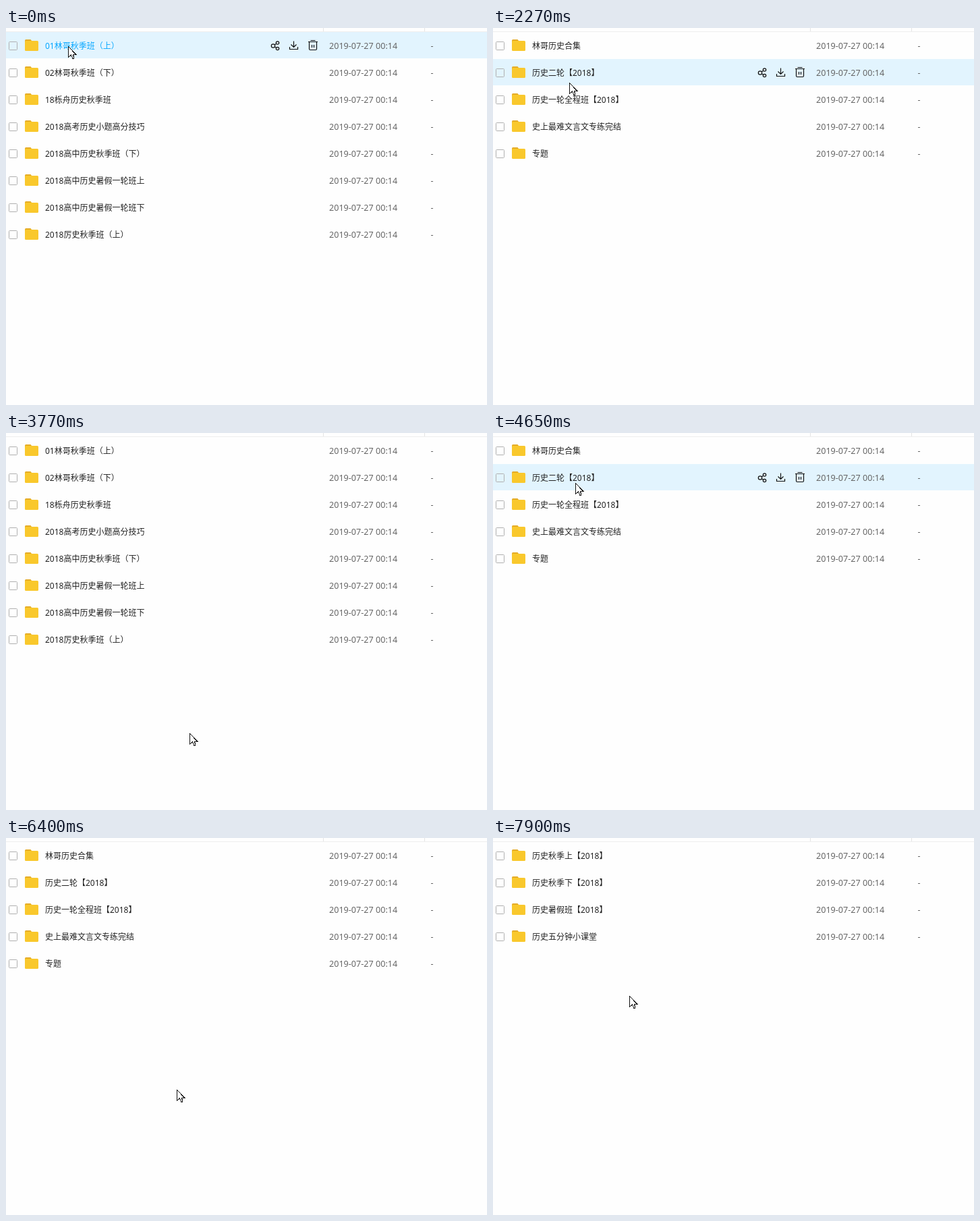
Recreate the animation shown at these times as an HTML page. Size 713x559 px, loop 8 s.

```html
<!DOCTYPE html>
<html lang="zh-CN">
<head>
<meta charset="utf-8">
<style>
  html, body { margin: 0; width: 100%; height: 100%; overflow: hidden; background: #fefefe; }
  svg { display: block; }
  text { font: 12px "Noto Sans", "Noto Sans CJK SC", "Noto Sans CJK", sans-serif; fill: #222; }
  .meta { font-size: 12.6px; fill: #666; }
  .active { fill: #06a7ff; }
  .icons { fill: none; stroke: #111; stroke-width: 1.2; }
</style>
</head>
<body>
<svg width="713" height="559">
  <defs>
    <g id="folder">
      <path d="M28 23V18.5Q28 17 29.5 17H36.5L38.5 19.5V23Z" fill="#e5ac27"/>
      <rect x="28" y="19" width="20" height="15" rx="1.5" fill="#f9c82c"/>
    </g>
    <g id="actions" class="icons">
      <circle cx="396" cy="26.5" r="2.7"/>
      <circle cx="402.5" cy="22" r="2.2"/>
      <circle cx="402.5" cy="30.5" r="2.2"/>
      <path d="M398.3 25L400.7 23.3M398.3 28L400.7 29.3"/>
      <path d="M420.5 28V31.5H432.5V28M426.5 19.5V28M422.5 24.5L426.5 28.5L430.5 24.5"/>
      <path d="M451.5 18.5H458.5M448 20.5H462M449.5 20.5V31Q449.5 32.5 451 32.5H459Q460.5 32.5 460.5 31V20.5M453.5 25V29M456.5 25V29"/>
    </g>
  </defs>
  <path d="M0 5.5H713" stroke="#eee"/>
  <path d="M470.5 0V5M620.5 0V5" stroke="#e4e4e4"/>
  <g id="rows"></g>
  <path id="cursor" d="M.5 .5V16.5L4.5 13L7 18.5H8.5L9 17L7 12H11.5Z" fill="#fff" stroke="#111" shape-rendering="crispEdges"/>
</svg>
<script>
const LOOP = 8000;
const ROW_TOP = 6, ROW_PITCH = 40;
const STEP = 130; // typical time between two pointer positions

const folders = {
  autumn: ['01林哥秋季班（上）', '02林哥秋季班（下）', '18栎舟历史秋季班', '2018高考历史小题高分技巧',
    '2018高中历史秋季班（下）', '2018高中历史暑假一轮班上', '2018高中历史暑假一轮班下', '2018厉史秋季班（上）'],
  root: ['林哥历史合集', '历史二轮【2018】', '历史一轮全程班【2018】', '史上最难文言文专练完结', '专题'],
  second: ['历史二轮上【2018】', '历史二轮下【2018】'],
  first: ['历史秋季上【2018】', '历史秋季下【2018】', '历史暑假班【2018】', '历史五分钟小课堂'],
};

const visits = [];
const glides = [];
const open = (start, folder) => visits.push({ start, folder });
// The pointer reaches (x, y) in visible steps, the first at start, the last at end.
const glide = (start, x, y, end = start) => glides.push({ start, end, x, y });

open(0, 'autumn');
glide(0, 92, 27);
open(1250, 'root');
glide(2120, 94, 32);
glide(2270, 113, 81);
glide(2420, 110, 130);
glide(2570, 92, 30, 2930);

open(3200, 'autumn');
glide(3350, 272, 445, 3770);
open(4050, 'root');
glide(4170, 122, 74, 4650);
glide(4800, 117, 72);

open(5350, 'second');
glide(5470, 278, 423, 5860);
glide(5980, 253, 373, 6400);
open(6400, 'root');
glide(6520, 172, 206, 6790);
glide(6940, 131, 110, 7480);
open(7630, 'first');
glide(7750, 202, 234, 7900);

const rows = document.getElementById('rows');
const cursor = document.getElementById('cursor');
const easeOut = p => 1 - (1 - p) ** 2;
const mix = (a, b, p) => Math.round(a + (b - a) * p);

function pointerAt(t) {
  const index = glides.findLastIndex(g => g.start <= t);
  const to = glides[index];
  const from = glides[index - 1] ?? to;
  const gaps = Math.round((to.end - to.start) / STEP);
  const gap = (to.end - to.start) / gaps || LOOP;
  const taken = Math.min(gaps, Math.floor((t - to.start) / gap)) + 1;
  const p = easeOut(taken / (gaps + 1));
  return { x: mix(from.x, to.x, p), y: mix(from.y, to.y, p) };
}

function rowMarkup(name, index, hovered, linked) {
  return `<g transform="translate(0 ${index * ROW_PITCH})">
    ${hovered ? `<rect y="${ROW_TOP}" width="713" height="39" fill="#e2f4fe"/><use href="#actions"/>` : ''}
    <rect x="4.5" y="20.5" width="12" height="12" rx="1" fill="none" stroke="#b0b0b0"/>
    <use href="#folder"/>
    <text x="58" y="31" class="${linked ? 'active' : ''}">${name}</text>
    <text x="479" y="31" class="meta">2019-07-27 00:14</text>
    <text x="629.5" y="31" class="meta">-</text>
  </g>`;
}

let shown = '';
function render(t) {
  const { x, y } = pointerAt(t);
  const names = folders[visits.findLast(v => v.start <= t).folder];
  const hoverRow = Math.floor((y - ROW_TOP) / ROW_PITCH);
  const offset = y - hoverRow * ROW_PITCH;
  const onName = offset > 20 && offset < 34;
  const markup = names.map((name, i) =>
    rowMarkup(name, i, i === hoverRow, i === hoverRow && onName)).join('');
  if (markup !== shown) rows.innerHTML = shown = markup;
  cursor.setAttribute('transform', `translate(${x} ${y})`);
}

const start = performance.now();
function tick() {
  render((performance.now() - start) % LOOP);
  requestAnimationFrame(tick);
}
tick();
</script>
</body>
</html>
```
